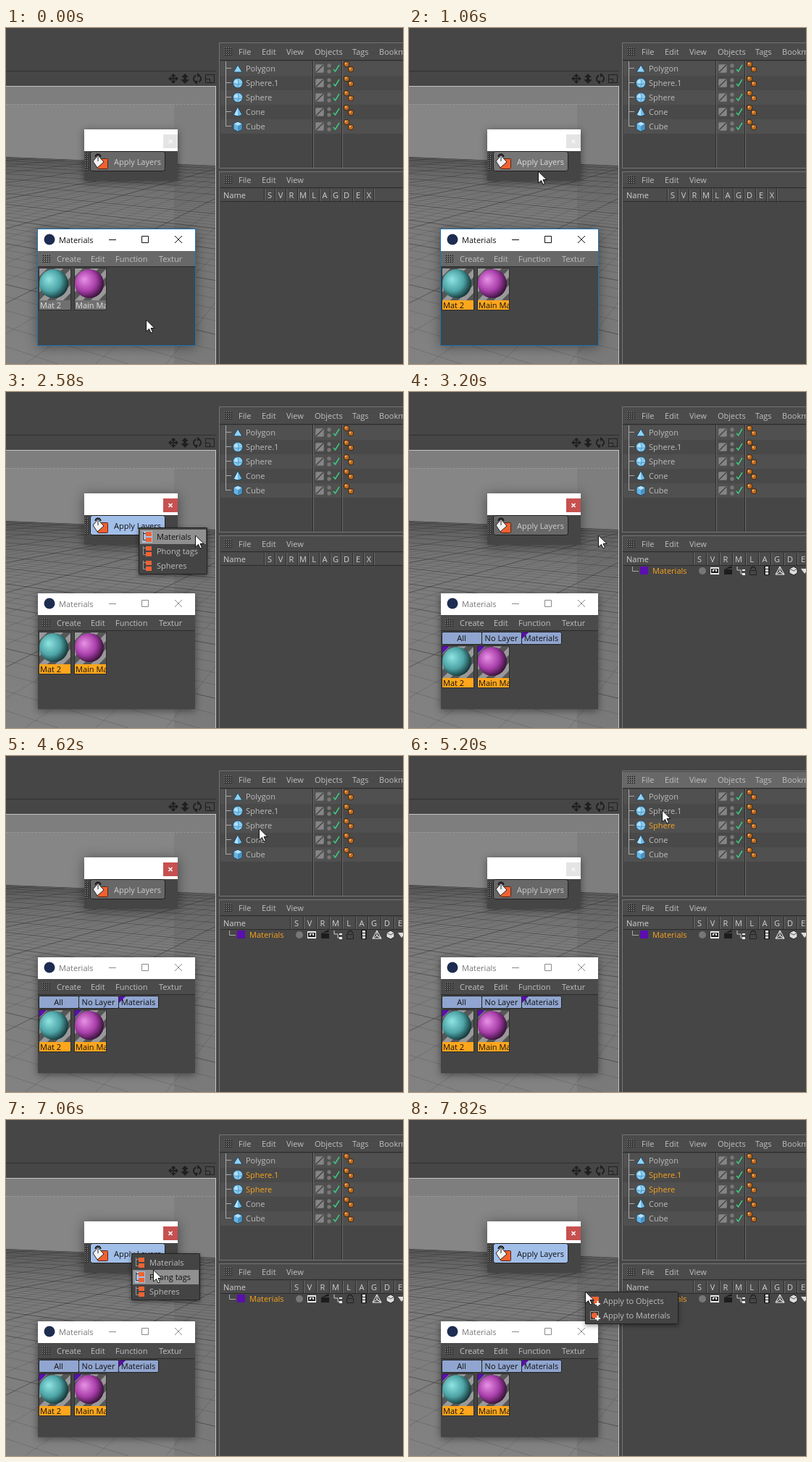
Recreate the animation shown at these times as an HTML page with a canvas. Size 548 by 464 pixels, loop 8000 ms.

```html
<!DOCTYPE html>
<html lang="en">
<head>
<meta charset="utf-8">
<style>
html, body { margin: 0; width: 100%; height: 100%; overflow: hidden; background: #464646; }
canvas { display: block; }
</style>
</head>
<body>
<canvas id="stage" width="548" height="464"></canvas>
<script>
const g = document.getElementById('stage').getContext('2d');
const LOOP = 8000, ORANGE = '#f9a31c', PURPLE = '#5a0fae', BLUE = '#a2bfe9';

// Cursor tip: time, x, y
const path = [
  [0, 194, 403], [30, 194, 403], [820, 189, 206], [1060, 179, 198], [1370, 183, 186],
  [1860, 183, 186], [2580, 262, 198], [3750, 262, 198], [3900, 258, 208], [4550, 354, 101],
  [4620, 350, 100], [5200, 350, 75], [5790, 350, 75], [6270, 174, 179], [6440, 173, 183],
  [6700, 173, 183], [7480, 243, 236], [7550, 244, 237], [LOOP, 244, 237]
];

function cursorAt(t) {
  const i = Math.max(1, path.findIndex(p => p[0] > t));
  const [t0, x0, y0] = path[i - 1], [t1, x1, y1] = path[i];
  const u = (t - t0) / (t1 - t0), e = u * u * (3 - 2 * u);
  return [Math.round(x0 + (x1 - x0) * e), Math.round(y0 + (y1 - y0) * e)];
}

function rect(x, y, w, h, color) { g.fillStyle = color; g.fillRect(x, y, w, h); }

function text(s, x, y, color = '#bdbdbd', align = 'left') {
  g.font = '11px "Open Sans", "Noto Sans", sans-serif';
  g.textAlign = align;
  g.fillStyle = color;
  g.fillText(s, x, y + 4);
}

function poly(points, fill, stroke, width = 1) {
  g.beginPath();
  for (let i = 0; i < points.length; i += 2) g.lineTo(points[i], points[i + 1]);
  if (fill) { g.closePath(); g.fillStyle = fill; g.fill(); }
  if (stroke) { g.strokeStyle = stroke; g.lineWidth = width; g.stroke(); }
}

function disc(x, y, r, fill) {
  g.beginPath(); g.arc(x, y, r, 0, 7); g.fillStyle = fill; g.fill();
}

function box(x, y, w, h, r, fill, stroke) {
  g.beginPath(); g.roundRect(x + .5, y + .5, w - 1, h - 1, r);
  if (fill) { g.fillStyle = fill; g.fill(); }
  if (stroke) { g.strokeStyle = stroke; g.lineWidth = 1; g.stroke(); }
}

function clipped(x, y, w, h, draw) {
  g.save(); g.beginPath(); g.rect(x, y, w, h); g.clip(); draw(); g.restore();
}

function shadowed(x, y, w, h, blur) {
  g.save();
  g.shadowColor = 'rgba(0,0,0,.45)'; g.shadowBlur = blur; g.shadowOffsetY = 2;
  rect(x, y, w, h, '#454545');
  g.restore();
}

function grip(x, y, w, h) {
  for (let j = 0; j < h; j += 3)
    for (let i = 0; i < w; i += 3) {
      rect(x + i, y + j, 2, 2, '#292929');
      rect(x + i, y + j, 1, 1, '#979797');
    }
}

// Dark line with a light edge to its right
function groove(x, y, h) {
  rect(x, y, 1, h, '#2b2b2b');
  rect(x + 1, y, 1, h, '#6c6c6c');
}

function menuBar(x, y, w, h, items, active) {
  rect(x, y, w, h, active ? '#686868' : '#4b4b4b');
  rect(x, y + h, w, 1, '#2b2b2b');
  grip(x + 6, y + 5, 12, 12);
  for (const [s, tx] of items) text(s, tx, y + 11, '#c0c0c0');
}

// Evenly spaced parallel floor lines that meet at (vx, HORIZON)
const HORIZON = 140;
function gridLines(vx, from, to, step) {
  for (let c = from, i = 0; c < to; c += step, i++) {
    poly([vx, HORIZON, vx + c * 900, HORIZON + 900], null,
      i % 5 ? 'rgba(60,60,60,.3)' : 'rgba(40,40,40,.6)', .8);
  }
}

function viewport() {
  rect(0, 59, 290, 1, '#303030');
  poly([231, 63, 234, 66, 231, 69, 228, 66], '#202020');
  poly([231, 77, 234, 74, 231, 71, 228, 74], '#202020');
  poly([224, 70, 228, 66.5, 228, 73.5], '#202020');
  poly([238, 70, 234, 66.5, 234, 73.5], '#202020');
  rect(227, 69, 8, 2, '#202020');
  poly([247, 63, 252, 68, 242, 68], '#202020');
  poly([247, 77, 253, 71, 241, 71], '#202020');
  rect(245, 67, 4, 5, '#202020');
  for (const a of [0, Math.PI]) {
    g.beginPath(); g.arc(264, 70, 5, a - 1.2, a + 1.2);
    g.strokeStyle = '#202020'; g.lineWidth = 2; g.stroke();
  }
  poly([264, 62, 268, 65, 264, 68], '#202020');
  poly([264, 78, 260, 75, 264, 72], '#202020');
  box(275, 64, 13, 12, 0, null, '#202020');
  box(275, 70, 7, 6, 0, null, '#202020');

  clipped(0, 81, 289, 383, () => {
    rect(0, 81, 290, 383, '#868686');
    const floor = g.createLinearGradient(0, 178, 0, 464);
    floor.addColorStop(0, '#787878'); floor.addColorStop(1, '#828282');
    g.save();
    poly([0, 178, 290, 190, 290, 464, 0, 464], floor);
    g.clip();
    gridLines(-900, 2.7, 24.3, .3);
    gridLines(480, -14, 1, .3);
    g.restore();
    rect(232, 81, 58, 383, 'rgba(0,0,0,.06)');
    rect(0, 81, 232, 24, 'rgba(0,0,0,.06)');
    g.setLineDash([3, 2]);
    poly([0, 105.5, 290, 105.5], null, 'rgba(165,165,165,.6)');
    g.setLineDash([]);
  });
  rect(0, 80, 290, 1, '#c4c4c4');
  rect(289, 80, 1, 384, '#c4c4c4');
}

function objectIcon(kind, x, y) {
  if (kind === 'Polygon') poly([x, y - 5, x + 6, y + 5, x - 6, y + 5], '#8fd2f7', '#24465c');
  else if (kind === 'Cone') {
    poly([x, y - 7, x + 6, y + 4, x, y + 6, x - 6, y + 4], '#71bbe8', '#24465c');
    poly([x, y - 6, x, y + 5, x - 5, y + 4], '#b4e2fb');
  } else if (kind === 'Cube') {
    poly([x, y - 7, x + 6, y - 4, x + 6, y + 4, x, y + 7, x - 6, y + 4, x - 6, y - 4], '#68b4e3', '#24465c');
    poly([x, y - 6, x + 5, y - 4, x, y - 1, x - 5, y - 4], '#b4e2fb');
    poly([x, y, x + 5, y - 3, x + 5, y + 3, x, y + 6], '#4592c3');
  } else {
    disc(x, y, 7, '#28506a');
    disc(x, y, 6.2, '#88cbf1');
    disc(x - 2, y - 2, 2.5, '#b4e2fb');
    poly([x - 6, y + 1, x, y + 2, x + 6, y + 1], null, '#4a92bf', .8);
    poly([x, y - 6, x + 1, y, x, y + 6], null, '#4a92bf', .8);
  }
}

function objects(s) {
  rect(294, 20, 254, 174, '#464646');
  rect(294, 20, 254, 1, '#757575');
  rect(294, 20, 1, 174, '#757575');
  menuBar(295, 22, 253, 22, [['File', 321], ['Edit', 353], ['View', 387], ['Objects', 426], ['Tags', 478], ['Bookmarks', 515]], s.objectsActive);
  ['Polygon', 'Sphere.1', 'Sphere', 'Cone', 'Cube'].forEach((name, i) => {
    const y = 56 + i * 20;
    rect(296, y - 10, 252, 20, i % 2 ? '#494949' : '#505050');
    rect(303, y - 1, 8, 1, '#aaa');
    objectIcon(name, 320, y);
    const on = name === 'Sphere' && s.sphere || name === 'Sphere.1' && s.sphere1;
    text(name, 331, y, on ? ORANGE : '#bdbdbd');
    box(427, y - 6, 12, 12, 1, '#858585', '#757575');
    poly([428, y + 5, 438, y - 5], null, '#3e3e3e', 1.3);
    disc(446, y - 4, 2.7, '#777');
    disc(446, y + 4, 2.7, '#777');
    poly([452, y + 1, 454.5, y + 4, 460, y - 5], null, '#3ecb82', 1.5);
    for (const [dx, dy] of [[470, -6], [476, 1]]) {
      disc(dx, y + dy, 4, '#3b220e');
      disc(dx, y + dy, 3.2, '#bd6b20');
      disc(dx - 1, y + dy - 1, 1.2, '#f0b36d');
    }
  });
  rect(303, 46, 1, 90, '#aaa');
  groove(423, 45, 148);
  groove(463, 45, 148);
  rect(294, 193, 254, 1, '#757575');
}

function layerIcons() {
  disc(405, 247, 5, '#777');
  rect(416, 242, 12, 10, '#eee'); rect(417, 244, 10, 6, '#222'); rect(419, 245, 6, 3, '#eee'); disc(422, 247, 1.5, '#222');
  rect(435, 245, 11, 7, '#1c1c1c'); poly([435, 245, 445, 240, 446, 243], '#1c1c1c');
  poly([453, 241, 453, 246, 458, 246, 458, 251, 464, 251], null, '#ccc');
  rect(460, 245, 4, 2, '#eee'); rect(460, 250, 4, 3, '#eee');
  box(470, 246, 10, 7, 0, null, '#222');
  g.beginPath(); g.arc(475, 245, 3.5, Math.PI, 0); g.strokeStyle = '#222'; g.lineWidth = 1.5; g.stroke();
  rect(490, 240, 8, 13, '#222');
  for (let y = 241; y < 252; y += 4) rect(492, y, 4, 3, '#eee');
  poly([512, 241, 518, 252, 506, 252, 512, 241, 512, 248, 518, 252, 512, 248, 506, 252], null, '#eee');
  poly([531, 241, 536, 244, 536, 250, 531, 253, 525, 250, 525, 244], '#ddd', '#222');
  poly([525, 244, 531, 247, 536, 244], null, '#555');
  poly([541, 244, 551, 244, 546, 251], '#ddd');
}

function layers(s) {
  rect(294, 198, 254, 266, '#464646');
  rect(294, 198, 254, 1, '#757575');
  rect(294, 198, 1, 266, '#757575');
  menuBar(295, 199, 253, 21, [['File', 321], ['Edit', 353], ['View', 387]]);
  rect(296, 222, 252, 17, '#4c4c4c');
  rect(296, 239, 252, 1, '#2b2b2b');
  text('Name', 300, 231, '#d0d0d0');
  const start = s.layer ? 401 : 364, step = s.layer ? 17.9 : 15.2;
  [...'SVRMLAGDEX'].forEach((c, i) => {
    const x = Math.round(start + i * step);
    text(c, x, 231, '#d0d0d0', 'center');
    groove(Math.round(x - step / 2), 222, 17);
  });
  if (!s.layer) { groove(507, 222, 17); return; }
  poly([308.5, 241, 308.5, 247.5, 317, 247.5], null, '#aaa');
  rect(319, 241, 11, 11, PURPLE);
  text('Materials', 336, 247, ORANGE);
  layerIcons();
}

function layerIcon(x, y, lit) {
  if (lit) rect(x - 7, y - 8, 14, 16, '#a9c0e2');
  poly([x - 5.5, y - 7, x - 5.5, y + 4.5, x, y + 4.5], null, lit ? '#333' : '#999');
  poly([x - 5, y - 4.5, x, y - 4.5], null, lit ? '#333' : '#999');
  rect(x - 2, y - 7, 8, 6, '#ee6334');
  rect(x - 2, y + 1, 8, 6, '#ee6334');
}

function bucketIcon() {
  box(126, 180, 15, 15, 1, '#ef6130', '#5b2413');
  g.beginPath(); g.arc(127, 178, 3.5, Math.PI, 0);
  g.strokeStyle = '#181818'; g.lineWidth = 2; g.stroke();
  poly([127, 176, 135, 185, 126, 193, 120, 184], '#f1f1f1', '#222');
  poly([127, 178, 127, 184], null, '#222');
}

function toolbar(s) {
  shadowed(108, 140, 129, 71, s.toolActive ? 16 : 10);
  rect(108, 140, 129, 30, '#fff');
  rect(217, 147, 20, 19, s.toolActive ? '#c75050' : '#e4e4e4');
  const x = s.toolActive ? '#fff' : '#f6f6f6';
  poly([224.5, 154, 229.5, 159], null, x, 1.6);
  poly([229.5, 154, 224.5, 159], null, x, 1.6);
  grip(109, 174, 5, 22);
  box(116, 170, 104, 28, 3, s.pressed ? BLUE : s.hover ? '#757575' : '#686868', '#202020');
  bucketIcon();
  text('Apply Layers', 149, 185, s.pressed ? '#111' : s.hover ? '#dcdcdc' : '#cecece');
}

function thumbnail(x, y, light, mid, dark, label, s) {
  clipped(x, y, 43, 58, () => {
    rect(x, y, 43, 44, '#565656');
    for (let i = -44; i < 88; i += 22) poly([x + i, y + 44, x + i + 11, y + 44, x + i + 55, y, x + i + 44, y], '#999');
    const ball = g.createRadialGradient(x + 13, y + 15, 1, x + 16, y + 18, 26);
    ball.addColorStop(0, light); ball.addColorStop(.55, mid); ball.addColorStop(1, dark);
    disc(x + 20, y + 21, 20, ball);
    if (s.tabs) poly([x, y, x + 10, y, x, y + 10], PURPLE);
    rect(x, y + 44, 43, 13, s.selected ? '#ffa61c' : '#707070');
    text(label, x + 1, y + 51, s.selected ? '#111' : '#dedede');
  });
  box(x - 1, y - 1, 45, 59, 0, null, '#2d2d2d');
}

function materials(s) {
  shadowed(44, 278, 217, 160, s.matActive ? 16 : 10);
  rect(44, 278, 217, 30, '#fff');
  const ink = s.matActive ? '#111' : '#8a8a8a';
  disc(60, 292, 7.5, '#1d2c50');
  text('Materials', 73, 293, s.matActive ? '#111' : '#777');
  rect(142, 292, 10, 1, ink);
  box(187, 287, 10, 10, 0, null, ink);
  poly([233, 287, 243, 297], null, ink);
  poly([243, 287, 233, 297], null, ink);
  menuBar(44, 308, 217, 21, [['Create', 70], ['Edit', 117], ['Function', 151], ['Textur', 211]], s.matActive);
  if (s.tabs) {
    [['All', 46], ['No Layer', 101], ['Materials', 156]].forEach(([label, x]) => {
      box(x - 1, 331, 56, 18, 2, '#90a5cf', '#222');
      if (label === 'Materials') poly([x, 332, x + 9, 332, x, 341], PURPLE);
      text(label, x + 26.5, 340, '#111', 'center');
    });
  }
  const y = s.tabs ? 351 : 332;
  thumbnail(46, y, '#8ce0df', '#4ea4a6', '#0c2628', 'Mat 2', s);
  thumbnail(95, y, '#e58ce3', '#a83fa9', '#270a29', 'Main Mat', s);
  if (s.matActive) box(43, 277, 219, 162, 0, null, '#1d72b3');
}

function popup(x, y, w, items, kind, [cx, cy]) {
  const h = items.length * 20 + 5;
  shadowed(x, y, w, h, 6);
  box(x, y, w, h, 2, '#444', '#222');
  items.forEach((label, i) => {
    const top = y + 3 + i * 20, mid = top + 10;
    const lit = cx >= x && cx < x + w && cy >= top && cy < top + 20;
    if (lit) rect(x + 2, top, w - 4, 20, '#909090');
    if (kind === 'layers') layerIcon(x + 12, mid, lit);
    else {
      if (i) { box(x + 7, mid - 6, 12, 12, 0, '#333', '#999'); disc(x + 13, mid, 4, '#ee6334'); }
      else { rect(x + 7, mid - 6, 5, 5, '#ee6334'); rect(x + 12, mid - 6, 7, 10, '#ee6334'); }
      rect(x + 14, mid + 3, 7, 2, '#fff'); rect(x + 16.5, mid, 2, 7, '#fff');
    }
    text(label, x + 25, mid, lit ? '#111' : '#bdbdbd');
  });
}

function pointer([tipX, y]) {
  const x = tipX - .5;
  poly([x, y, x, y + 16, x + 4, y + 12.5, x + 6.5, y + 18, x + 9, y + 17, x + 6.5, y + 11.5, x + 11.5, y + 11.5], '#fff', '#111');
}

function draw(now) {
  const t = now % LOOP, cursor = cursorAt(t);
  const during = (a, b) => t >= a && t < b;
  const s = {
    selected: t >= 30,
    matActive: t < 1860,
    toolActive: during(1860, 4700) || t >= 6680,
    pressed: during(1860, 2890) || t >= 6680,
    hover: during(860, 1860) || during(6230, 6680),
    objectsActive: during(4700, 6680),
    sphere: t >= 4700,
    sphere1: t >= 5550,
    layer: t >= 2960,
    tabs: t >= 3040
  };
  rect(0, 0, 548, 464, '#464646');
  viewport();
  objects(s);
  layers(s);
  toolbar(s);
  materials(s);
  const names = ['Materials', 'Phong tags', 'Spheres'];
  if (during(1860, 2890)) popup(183, 187, 95, names, 'layers', cursor);
  if (during(6680, 7820)) popup(173, 184, 95, names, 'layers', cursor);
  if (t >= 7820) popup(243, 237, 129, ['Apply to Objects', 'Apply to Materials'], 'apply', cursor);
  pointer(cursor);
  requestAnimationFrame(() => draw(performance.now() - begin));
}

const begin = performance.now();
draw(0);
</script>
</body>
</html>
```
